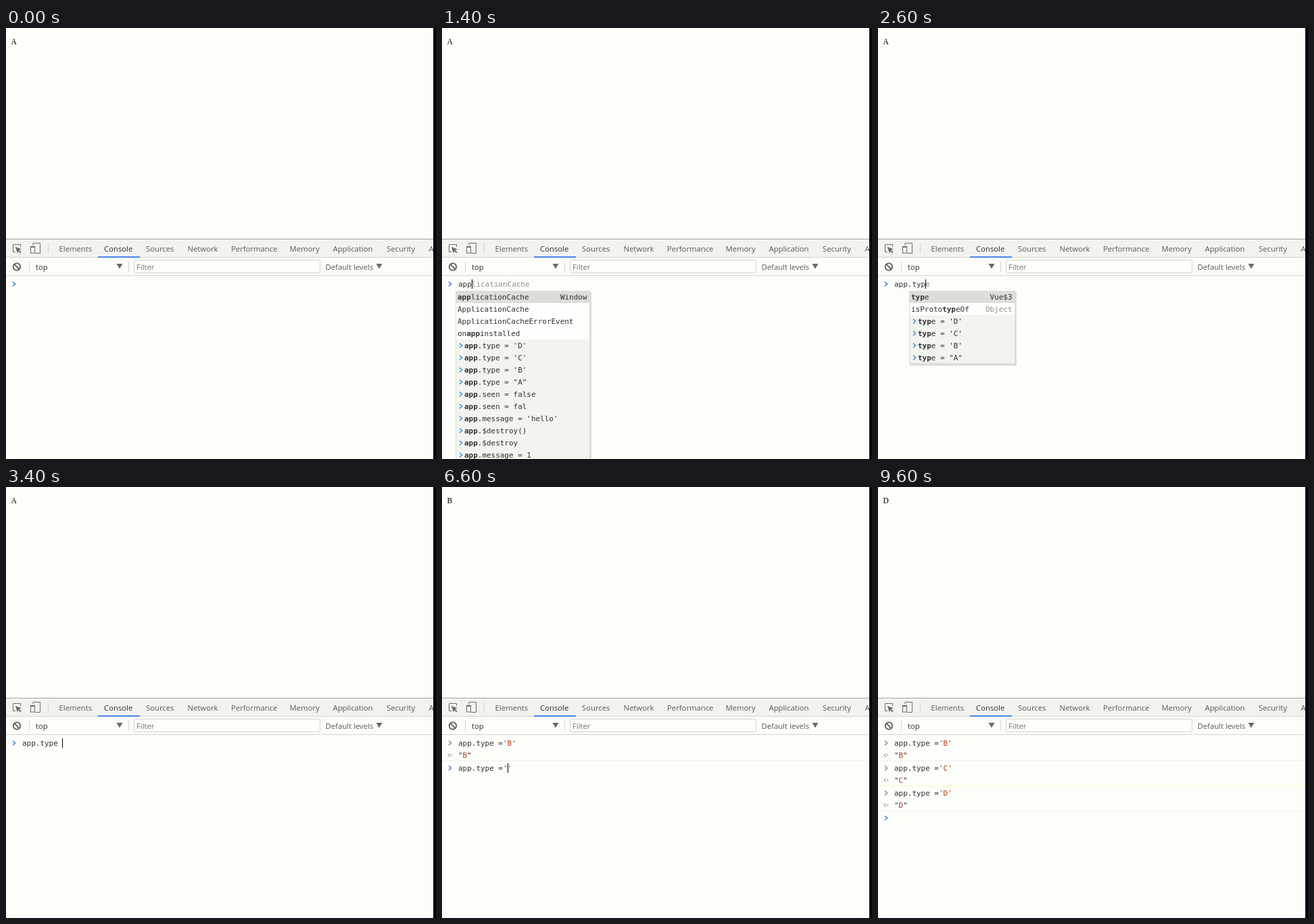
These frames come from a looping animation (636 by 638 pixels, 9800 ms). An HTML page:

```html
<!DOCTYPE html>
<html lang="en">
<head>
<meta charset="utf-8">
<title>Console session</title>
<style>
html, body { margin: 0; width: 100%; height: 100%; overflow: hidden; background: #fcfefa; }
svg { display: block; width: 636px; height: 638px; }
text { white-space: pre; fill: #303030; }
.ui text { font: 11.3px "Open Sans", "Noto Sans", sans-serif; fill: #5a5a58; }
.ui .on { fill: #303030; }
.mono text { font: 10.96px "DejaVu Sans Mono", monospace; }
.mono .match { font-weight: bold; }
.mono .str { fill: #b03a1a; }
.mono .ghost { fill: #90908a; }
.mono .hint { text-anchor: end; }
#page { font: 11.5px "Liberation Serif", serif; fill: #000; }
.line { fill: none; stroke: #6a6a66; }
.rule { stroke: #d2d4cc; }
.arrow { fill: none; stroke-width: 1.5; }
</style>
</head>
<body>
<svg viewBox="0 0 636 638">
  <rect width="636" height="638" fill="#fcfefa"/>
  <text id="page" x="7.5" y="24">A</text>

  <g class="ui">
    <rect y="313" width="632" height="27" fill="#f1f3ed"/>
    <path d="M0 312.5H632" stroke="#a3a59c"/>
    <path class="rule" d="M0 339.5H632M0 366.5H632M62.5 319V334M34.5 346V361M181.5 346V361"/>
    <rect x="136" y="338" width="62" height="2" fill="#4a86e8"/>

    <path class="line" d="M14 331.5H10.5V320.5H21.5V324"/>
    <path d="M14 324L23 327.5L19.6 328.8L22.6 332L21.2 333.3L18.2 330.2L16.8 333.4Z" fill="#6a6a66"/>
    <path class="line" d="M40 322V318.5H50.5V333.5H43"/>
    <rect class="line" x="36.5" y="323.5" width="6" height="9.5"/>
    <path class="line" stroke-width="2" d="M36 324H43"/>

    <g id="tabs"></g>

    <circle class="line" cx="16" cy="353.5" r="5.2" stroke-width="2"/>
    <path class="line" stroke-width="2" d="M12.5 350L19.5 357"/>
    <text class="on" x="44" y="358">top</text>
    <path d="M163.5 349H172.5L168 356.5ZM547.5 349H556.5L552 356.5Z" fill="#6a6a66"/>
    <rect x="189.5" y="343.5" width="275" height="19" rx="1" fill="#fcfefa" stroke="#d2d4cc"/>
    <text x="193" y="358" style="fill:#757572">Filter</text>
    <text x="472.5" y="358">Default levels</text>
  </g>

  <g id="console" class="mono"></g>
  <rect x="632" width="4" height="638"/>
</svg>
<script>
const LOOP = 9800, CHAR = 6.6, LEFT = 24;
const byId = id => document.getElementById(id);

byId('tabs').innerHTML = [
  ['Elements', 78.5], ['Console', 145], ['Sources', 207], ['Network', 268.5], ['Performance', 333],
  ['Memory', 419.5], ['Application', 483.5], ['Security', 563], ['Audits', 625.5]
].map(([name, x]) => `<text x="${x}" y="331"${name === 'Console' ? ' class="on"' : ''}>${name}</text>`).join('');

const typeLog = [">type = 'D'", ">type = 'C'", ">type = 'B'", '>type = "A"'];
const memberLog = [...typeLog, '>seen = false', '>seen = fal', ">message = 'hello'", '>$destroy()', '>$destroy', '>message = 1'];
const appLog = memberLog.map(s => '>app.' + s.slice(1));

// Each popup: typed part, column, width, entries as "name|hint" or ">history"
const popups = {
  a: ['a', 0, 199, ['app|Window', 'alert', 'applicationCache', 'atob', 'addEventListener', ...appLog]],
  ap: ['ap', 0, 199, ['app|Window', 'applicationCache', 'ApplicationCache', 'ApplicationCacheErrorEvent', 'onappinstalled', ...appLog]],
  app: ['app', 0, 199, ['applicationCache|Window', 'ApplicationCache', 'ApplicationCacheErrorEvent', 'onappinstalled', ...appLog]],
  dot: ['', 4, 157, ['type|Vue$3', 'message', 'seen', '$attrs', '$children', ...memberLog]],
  t: ['t', 4, 199, ['type|Vue$3', '$attrs', '$destroy', '$mount', 'constructor|Object', 'hasOwnProperty', 'isPrototypeOf', 'toString', ...typeLog]],
  ty: ['ty', 4, 199, ['type|Vue$3', 'hasOwnProperty|Object', 'isPrototypeOf', 'propertyIsEnumerable', ...typeLog]],
  typ: ['typ', 4, 157, ['type|Vue$3', 'isPrototypeOf|Object', ...typeLog]],
  type: ['type', 4, 157, ['isPrototypeOf|Object', ...typeLog]]
};

// [time, commands run, prompt text, caret column (-1 hidden), popup, ghost text]
const set = "app.type ='";
const steps = [
  [0, 0, '', -1],
  [400, 0, '', 0],
  [800, 0, 'a', 1, 'a', 'pp'],
  [1000, 0, 'ap', 2, 'ap', 'p'],
  [1200, 0, 'app', 3, 'app', 'licationCache'],
  [1800, 0, 'app.', 4, 'dot', 'type'],
  [2000, 0, 'app.t', 5, 't', 'ype'],
  [2200, 0, 'app.ty', 6, 'ty', 'pe'],
  [2600, 0, 'app.typ', 7, 'typ', 'e'],
  [2800, 0, 'app.type', 8, 'type'],
  [3200, 0, 'app.type ', 9],
  [3800, 0, 'app.type ', -1],
  [4000, 0, 'app.type =', 10],
  [4400, 0, set + "'", 11],
  [4800, 0, set + "B'", 12],
  [5200, 1, '', 0],
  [5600, 1, set + "B'", 13],
  [6000, 1, set + "B'", -1],
  [6200, 1, set + "B'", 12],
  [6600, 1, set + "'", 11],
  [6800, 1, set + "C'", 12],
  [7200, 2, '', 0],
  [7400, 2, set + "C'", 13],
  [7800, 2, set + "C'", 12],
  [8000, 2, set + "'", 11],
  [8400, 2, set + "D'", 12],
  [8800, 2, set + "D'", -1],
  [9000, 3, '', 0],
  [9600, 3, '', -1]
];

const label = (x, y, body, cls = '') => `<text x="${x}" y="${y + 4}" class="${cls}">${body}</text>`;
const span = (body, cls) => `<tspan class="${cls}">${body}</tspan>`;
const chevron = (x, y, color) => `<path class="arrow" d="M${x} ${y - 3.3}l3.6 3.3l-3.6 3.3" stroke="${color}"/>`;

function code(s) {
  const i = s.indexOf("'");
  return i < 0 ? s : s.slice(0, i) + span(s.slice(i), 'str');
}

function emphasise(name, typed) {
  const i = name.indexOf(typed);
  if (!typed || i < 0) return name;
  const end = i + typed.length;
  return name.slice(0, i) + span(name.slice(i, end), 'match') + name.slice(end);
}

function popup([typed, column, width, items]) {
  const x = Math.round(LEFT + column * CHAR - 4), top = 389, row = 18;
  const height = items.length * row;
  const plain = items.filter(s => s[0] !== '>').length;
  let out = `<rect x="${x + 1}" y="${top + 2}" width="${width + 1}" height="${height + 1}" fill="#dcdfd6"/>
    <rect x="${x + .5}" y="${top + .5}" width="${width - 1}" height="${height - 1}" fill="#f2f4ee" stroke="#dcdfd6"/>
    <rect x="${x + 1}" y="${top}" width="${width - 2}" height="${plain * row}" fill="#fefffc"/>
    <rect x="${x}" y="${top}" width="${width}" height="${row}" fill="#dcded8"/>`;
  items.forEach((item, i) => {
    const y = 398 + i * row;
    if (item[0] === '>') {
      out += chevron(x + 6, y, '#4a86e8') + label(x + 13, y, emphasise(item.slice(1), typed));
    } else {
      const [name, hint] = item.split('|');
      out += label(x + 3, y, emphasise(name, typed));
      if (hint) out += label(x + width - 4.5, y, hint, i ? 'hint ghost' : 'hint');
    }
  });
  return out;
}

function draw([, runs, text, caret, menu, ghost = '']) {
  let out = '';
  for (let i = 0; i < runs; i++) {
    const y = 379 + i * 37, value = 'BCD'[i];
    out += chevron(10, y, '#8a8a84') + label(LEFT, y, code(set + value + "'"))
      + `<path d="M12 ${y + 15.5}l-3 2.5l3 2.5" class="arrow" stroke="#b2b4aa"/>`
      + `<rect x="13" y="${y + 17}" width="2" height="2" fill="#b2b4aa"/>`
      + label(LEFT, y + 18, '"' + span(value, 'str') + '"')
      + `<path d="M0 ${y + 26.5}H632" stroke="${i === 1 ? '#ffffb0' : '#eef0e6'}"/>`;
  }
  const y = 379 + runs * 37;
  out += chevron(10, y, '#4278e0') + label(LEFT, y, code(text) + span(ghost, 'ghost'));
  if (caret >= 0) out += `<rect x="${Math.round(LEFT + caret * CHAR)}" y="${y - 7}" width="1" height="14"/>`;
  if (menu) out += popup(popups[menu]);
  byId('console').innerHTML = out;
  byId('page').textContent = 'ABCD'[runs];
}

let shown;
function tick() {
  const t = performance.now() % LOOP;
  const step = steps.filter(s => s[0] <= t).pop();
  if (step !== shown) draw(shown = step);
  requestAnimationFrame(tick);
}
tick();
</script>
</body>
</html>
```
